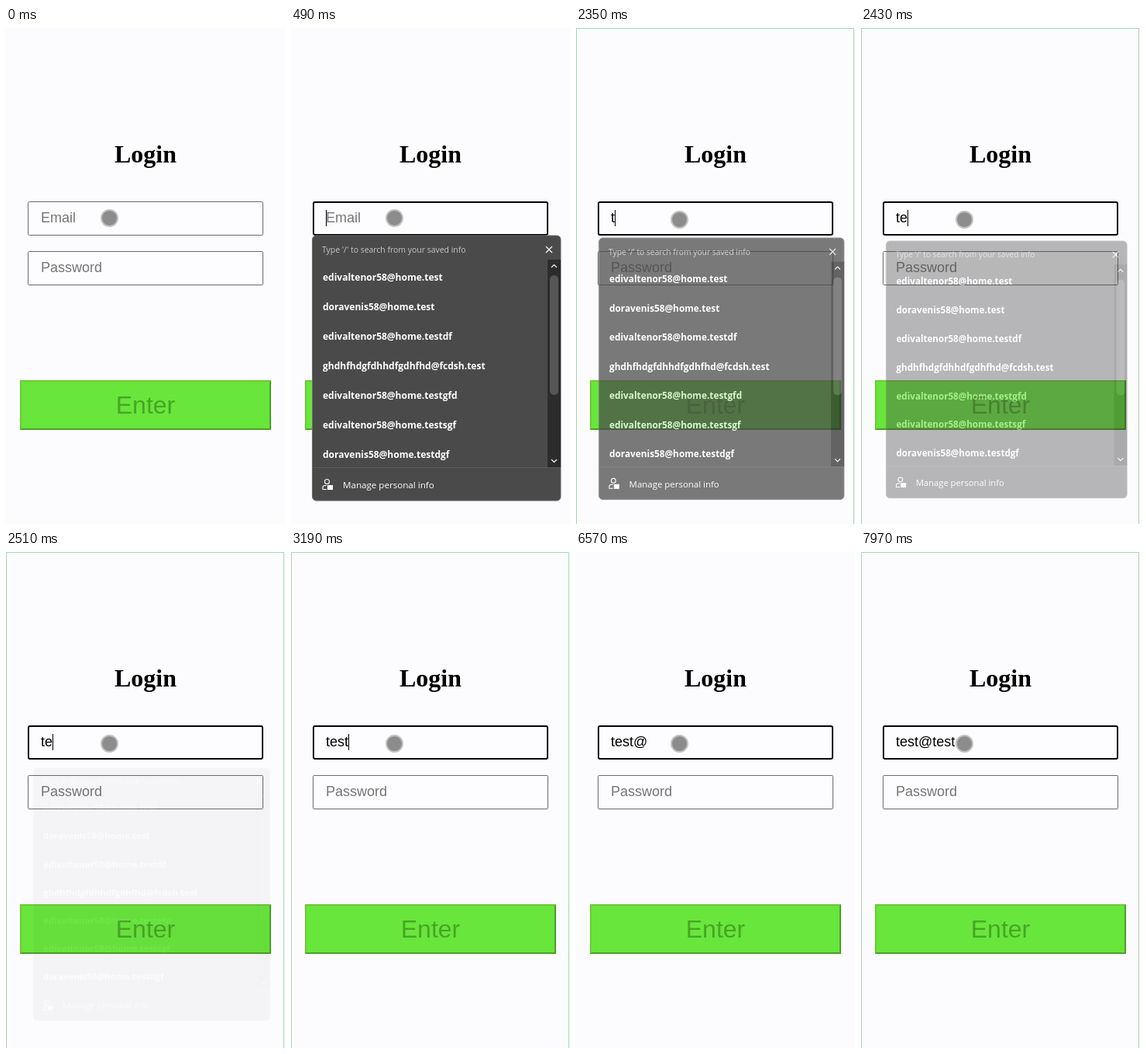
An HTML page that plays this animation: 360 by 638 pixels, repeating every 8000 ms.

```html
<!DOCTYPE html>
<html lang="en">
<head>
<meta charset="utf-8">
<title>Login</title>
<style>
  html, body { margin: 0; width: 100%; height: 100%; overflow: hidden; background: #fcfcff; }
  svg { display: block; width: 360px; height: 638px; }
  text { white-space: pre; }
  .field { font: 18px "Liberation Sans", Arial, sans-serif; }
  .hint { fill: #757575; }
  .box { fill: #fdfdff; stroke: #6b6b6b; }
  .focus { stroke: #050505; stroke-width: 2; }
  .ui { font: 11.6px "Open Sans", "Noto Sans", sans-serif; fill: #fff; }
  .row { font-size: 12px; font-weight: 700; }
  .line { fill: none; stroke: #fff; stroke-width: 1.1; }
</style>
</head>
<body>
<svg viewBox="0 0 360 638">
  <text x="180" y="173" text-anchor="middle" style="font:bold 32px 'Liberation Serif',Times,serif">Login</text>

  <rect id="email" class="box" rx="2"/>
  <text id="hint" class="field hint" x="45" y="250">Email</text>
  <text id="typed" class="field" x="45" y="250"></text>
  <path id="caret" d="M.5 234V255" stroke="#000"/>

  <rect class="box" x="28.5" y="287.5" width="303" height="43" rx="1"/>
  <text class="field hint" x="45" y="314">Password</text>

  <rect x="18" y="453" width="324" height="64" fill="#68e63c"/>
  <path d="M18 517V453H342L340 455H20V515Z" fill="#72c836"/>
  <path d="M342 453V517H18L20 515H340V455Z" fill="#4aa024"/>
  <text x="180" y="496" text-anchor="middle" style="font:32px 'Liberation Sans',Arial,sans-serif" fill="#47a624">Enter</text>

  <g id="popup">
    <rect x="27.5" y="267" width="320.5" height="341" rx="5" fill="#4a4a4a" stroke="#707070"/>
    <rect x="331" y="298" width="17" height="267" fill="#2c2c2c"/>
    <rect x="334" y="318" width="11" height="154" rx="5.5" fill="#565656"/>
    <path d="M28 565.5H348" stroke="#5c5c5c"/>
    <text class="ui" x="40" y="289" style="font-size:10.45px;fill:#c6c6c6">Type '/' to search from your saved info</text>
    <path class="line" d="M329 281l8 8m0-8l-8 8M336 308l3.5-3.5 3.5 3.5M336 555l3.5 3.5 3.5-3.5"/>
    <g id="rows"></g>
    <g class="line">
      <circle cx="46.5" cy="583.5" r="3"/>
      <path d="M46 593.5H41V591Q41 588.5 44 588.5H46"/>
      <rect x="47.5" y="588.5" width="6" height="5" fill="#fff"/>
    </g>
    <text class="ui" x="67" y="592">Manage personal info</text>
  </g>

  <circle id="pointer" cx="133.5" r="10.5" fill="#8c8c8c" stroke="#c2c2c2" stroke-width="2"/>
  <path id="frame" d="M.5 638V.5H358.5V638" fill="none" stroke="#a3d8b0"/>
</svg>
<script>
const $ = id => document.getElementById(id);
const LOOP = 8000, BLINK = 492;

const rows = [
  'edivaltenor58@home.test', 'doravenis58@home.test', 'edivaltenor58@home.testdf',
  'ghdhfhdgfdhhdfgdhfhd@fcdsh.test', 'edivaltenor58@home.testgfd',
  'edivaltenor58@home.testsgf', 'doravenis58@home.testdgf'
];
rows.forEach((name, i) => {
  const row = document.createElementNS('http://www.w3.org/2000/svg', 'text');
  row.setAttribute('class', 'ui row');
  row.setAttribute('x', 41);
  row.setAttribute('y', 325 + 38 * i);
  row.textContent = name;
  $('rows').append(row);
});

// [time, field value]; each entry restarts the caret blink
const keys = [
  [300, ''], [455, ''], [2280, 't'], [2425, 'te'], [2960, 'tes'], [3190, 'test'],
  [6070, 'test@'], [7060, 'test@t'], [7170, 'test@te'], [7290, 'test@tes'], [7475, 'test@test']
];
const frameTimes = [[2280, 2770], [2960, 3490], [5890, 6300], [7060, LOOP]];

const ramp = (t, from, to) => Math.min(1, Math.max(0, (t - from) / (to - from)));
const show = (id, on) => { $(id).style.display = on ? '' : 'none'; };

function setAttrs(id, attrs) {
  for (const name in attrs) $(id).setAttribute(name, attrs[name]);
}

function draw(t) {
  const key = keys.filter(k => k[0] <= t).pop();
  const value = key ? key[1] : '';
  const focused = Boolean(key);
  setAttrs('email', focused
    ? { class: 'box focus', x: 29, y: 224, width: 302, height: 42 }
    : { class: 'box', x: 28.5, y: 223.5, width: 303, height: 43 });

  show('hint', !value);
  $('typed').textContent = value;
  show('caret', focused && Math.floor((t - key[0]) / BLINK) % 2 === 0);
  const width = value ? $('typed').getComputedTextLength() : 0;
  setAttrs('caret', { transform: `translate(${Math.round(45 + width)})` });

  const open = ramp(t, 300, 470) * (1 - ramp(t, 2290, 2520));
  const scale = 0.95 + 0.05 * open;
  show('popup', open > 0);
  setAttrs('popup', {
    opacity: open,
    transform: `translate(188 ${437.5 + 3 * (1 - open)}) scale(${scale}) translate(-188 -437.5)`
  });

  setAttrs('pointer', { cy: 244.5 + 2 * ramp(t, 1215, 1250) });
  show('frame', frameTimes.some(([from, to]) => t >= from && t < to));
}

const start = performance.now();
function tick() {
  draw((performance.now() - start) % LOOP);
  requestAnimationFrame(tick);
}
tick();
</script>
</body>
</html>
```
